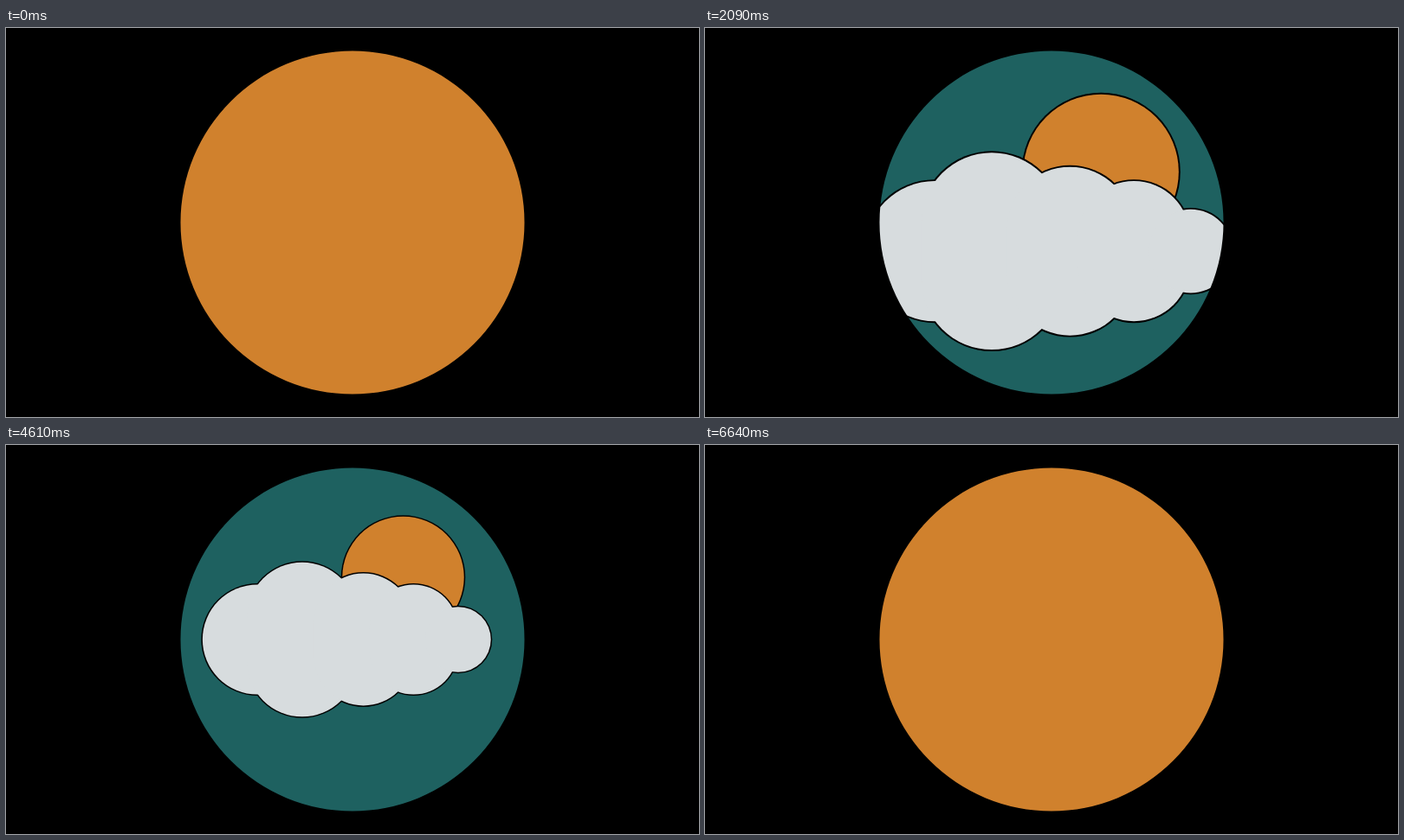
These frames come from a looping animation (800x450 px, 6.7 s). An HTML page with a canvas:

```html
<!DOCTYPE html>
<html lang="en">
<head>
<meta charset="utf-8">
<title>Sun and cloud</title>
<style>
  html, body { margin: 0; width: 100%; height: 100%; overflow: hidden; background: #000; }
  canvas { display: block; width: 800px; height: 450px; }
</style>
</head>
<body>
<canvas id="stage" width="800" height="450"></canvas>
<script>
const ctx = document.getElementById('stage').getContext('2d');
const LOOP = 6700;
const TAU = Math.PI * 2;
const SKY = '#1e6160', SUN = '#d0812d', CLOUD = '#d7dcde', INK = '#000';
const LINE = 1.5;

// Cloud lobes in units: x from the second lobe, radius, vertical stretch
const UNIT = 12.86;
const LOBES = [[-4, 5, 0], [0, 5, 2], [5.5, 4.5, 1.5], [10, 4, 1], [14, 3, 0]];

const clamp = (v, lo, hi) => Math.min(hi, Math.max(lo, v));
const zoom = (x, slow, fast) => 1 + slow * x ** 2 + fast * x ** 8;

function pose(sec) {
  const before = clamp(2.75 - sec, 0, 2.1);
  const after = clamp(sec - 4.72, 0, 1.4);
  const leaving = after > 0;
  const enter = zoom(before, 0.634, 0.025);
  return {
    sun: leaving ? zoom(after, 1.2, 0.27) : enter,
    cloud: leaving ? zoom(after, 1.4, 0.61) : enter,
    pivot: leaving ? 451.3 : 465,
    drift: -9.25 * (clamp(sec, 2.65, 4.72) - 2.65)
  };
}

function disc(x, y, r, color) {
  ctx.fillStyle = color;
  ctx.beginPath();
  ctx.arc(x, y, r, 0, TAU);
  ctx.fill();
}

function scaleAbout(x, y, s) {
  ctx.translate(x, y);
  ctx.scale(s, s);
  ctx.translate(-x, -y);
}

function drawSun(s) {
  ctx.save();
  scaleAbout(463.2, 104.8, s);
  disc(458.5, 153, 71 + LINE / 2, INK);
  disc(458.5, 153, 71 - LINE / 2, SUN);
  ctx.restore();
}

function lobes(x0, grow, color) {
  ctx.fillStyle = color;
  for (const [dx, radius, stretch] of LOBES) {
    const x = x0 + dx * UNIT, r = radius * UNIT + grow, h = stretch * UNIT;
    ctx.beginPath();
    ctx.arc(x, 225 - h, r, Math.PI, TAU);
    ctx.arc(x, 225 + h, r, 0, Math.PI);
    ctx.closePath();
    ctx.fill();
  }
}

function drawCloud({ cloud, pivot, drift }) {
  ctx.save();
  scaleAbout(pivot, 105, cloud);
  lobes(360 + drift, LINE / 2, INK);
  lobes(360 + drift, -LINE / 2, CLOUD);
  ctx.restore();
}

// Black surround with a round window
function drawFrame() {
  ctx.fillStyle = INK;
  ctx.beginPath();
  ctx.rect(0, 0, 800, 450);
  ctx.arc(400, 225, 198.5, 0, TAU);
  ctx.fill('evenodd');
}

function render(ms) {
  const p = pose(ms / 1000);
  ctx.fillStyle = SKY;
  ctx.fillRect(0, 0, 800, 450);
  drawSun(p.sun);
  drawCloud(p);
  drawFrame();
}

const start = performance.now();
function tick() {
  render((performance.now() - start) % LOOP);
  requestAnimationFrame(tick);
}
tick();
</script>
</body>
</html>
```
